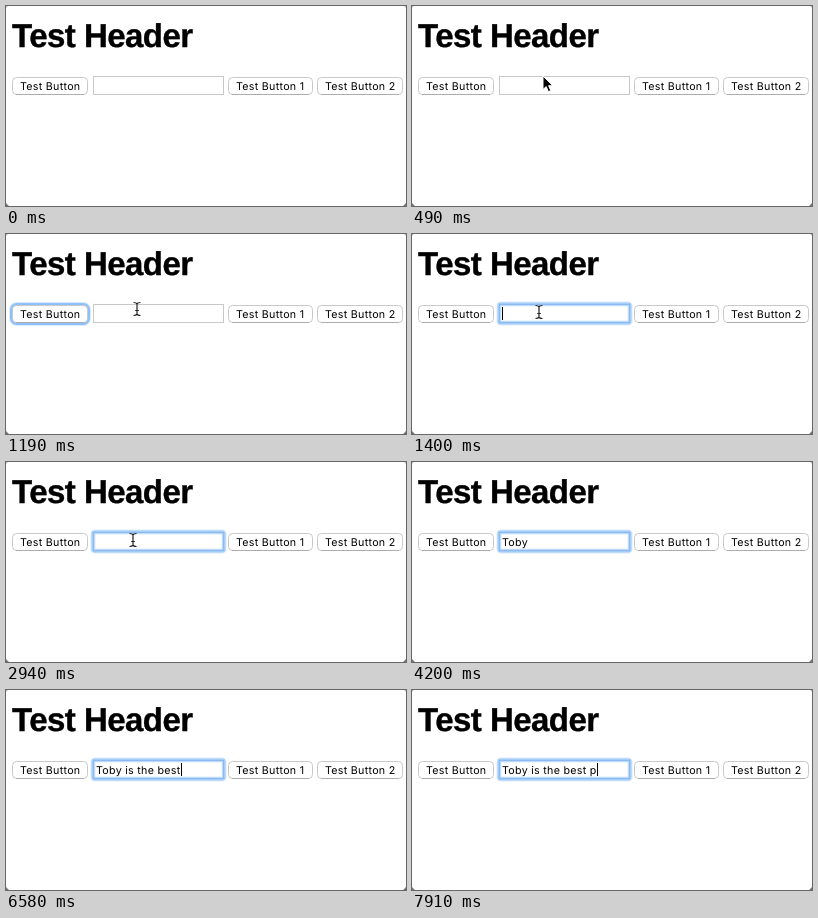
These frames come from a looping animation (400x200 px, 8 s). An HTML page:

```html
<!DOCTYPE html>
<html lang="en">
<head>
<meta charset="utf-8">
<title>Form focus and typing</title>
<style>
  html, body { margin: 0; width: 100%; height: 100%; overflow: hidden; background: #fff; }
  svg { display: block; width: 400px; height: 200px; }
  text { white-space: pre; fill: #000; text-rendering: geometricPrecision; }
  .heading {
    font: bold 33px "Liberation Sans", Arial, sans-serif;
    letter-spacing: -.53px; stroke: #000; stroke-width: .4px;
  }
  .ui { font: 10.7px Inter, "Open Sans", sans-serif; letter-spacing: .28px; }
</style>
</head>
<body>
<svg viewBox="0 0 400 200">
  <rect width="400" height="200" fill="#fff"/>
  <path d="M0 0h2l-2 2zM400 0h-2l2 2z" fill="#bbb"/>
  <path d="M0 200v-3l3 3zM400 200v-3l-3 3z" fill="#777"/>
  <text class="heading" x="6" y="41">Test Header</text>

  <g id="buttons"></g>

  <rect x="87.5" y="70.5" width="130" height="18" fill="#fff" stroke="#c8c8c8"/>
  <g id="fieldRing" fill="none">
    <rect x="87" y="70" width="131" height="19" rx="2" stroke="#dcebfc" stroke-width="5"/>
    <rect x="87" y="70" width="131" height="19" rx="1.5" stroke="#a3ccf8" stroke-width="3"/>
    <rect x="87.5" y="70.5" width="130" height="18" stroke="#8abaf0"/>
  </g>
  <text id="typed" class="ui" x="90" y="84"></text>
  <rect id="caret" y="73" width="1" height="13"/>

  <path id="arrow" d="M0 0V13.5L3.2 10.6L5.4 15.6L7.8 14.6L5.6 9.7H9.8Z"
        fill="#000" stroke="#fff" stroke-width="1" stroke-linejoin="round"/>
  <path id="beam" d="M-3.5 -6.5Q-.5 -6.5 0 -5Q.5 -6.5 3.5 -6.5M0 -5V5M-3.5 6.5Q-.5 6.5 0 5Q.5 6.5 3.5 6.5M-1.8 1.5H1.8"
        fill="none" stroke="#222" stroke-width="1.2"/>
</svg>
<script>
const LOOP = 8000, TICK = 70;
const BUTTON_FOCUS = 840, FIELD_FOCUS = 1400;
const CARET_ON = 490, CARET_PERIOD = 1050;
const MESSAGE = "Toby is the best p";
const KEY_TIMES = [
  3080, 3220, 3360, 3640, 3710,
  4760, 4900, 4970,
  5180, 5320, 5390, 5530,
  5950, 6160, 6370, 6580, 6790,
  7910
];
// time, x, y of the pointer
const POINTER = [
  [70, 374, 138], [280, 235, 98], [490, 131, 70], [770, 46, 80],
  [1050, 46, 80], [1190, 131, 75], [1330, 127, 78]
];

const $ = id => document.getElementById(id);
const show = (el, on) => el.setAttribute("visibility", on ? "visible" : "hidden");

function button(x, width, label) {
  return `<rect x="${x + .5}" y="71.5" width="${width - 1}" height="17" rx="4" fill="#fff" stroke="#c9c9c9"/>
    <path d="M${x + 4} 88.5H${x + width - 4}" stroke="#adadad"/>
    <text class="ui" x="${x + 8}" y="84">${label}</text>`;
}

$("buttons").innerHTML =
  `<g id="buttonRing" fill="none">
    <rect x="5.5" y="70.5" width="77" height="19" rx="5" stroke="#dcebfc" stroke-width="5"/>
    <rect x="5.5" y="70.5" width="77" height="19" rx="5" stroke="#8fbff8" stroke-width="3"/>
  </g>` +
  button(6, 76, "Test Button") +
  button(222, 85, "Test Button 1") +
  button(311, 86, "Test Button 2");

function pointerAt(t) {
  const next = POINTER.findIndex(p => p[0] > t);
  if (next < 0) return POINTER[POINTER.length - 1].slice(1);
  const [t0, x0, y0] = POINTER[Math.max(0, next - 1)];
  const [t1, x1, y1] = POINTER[next];
  const k = t1 > t0 ? (t - t0) / (t1 - t0) : 0;
  return [x0 + (x1 - x0) * k, y0 + (y1 - y0) * k];
}

function drawPointer(t) {
  const visible = t >= POINTER[0][0] && t < KEY_TIMES[0];
  const [x, y] = pointerAt(t);
  const overField = x > 87 && x < 218 && y > 70 && y < 89;
  for (const [el, on] of [[$("arrow"), !overField], [$("beam"), overField]]) {
    el.setAttribute("transform", `translate(${Math.round(x)} ${Math.round(y)})`);
    show(el, visible && on);
  }
}

function drawField(t) {
  const count = KEY_TIMES.filter(k => k <= t).length;
  const lastInput = count ? KEY_TIMES[count - 1] : FIELD_FOCUS;
  const focused = t >= FIELD_FOCUS;
  const typed = $("typed");
  typed.textContent = MESSAGE.slice(0, count);
  const width = count ? typed.getComputedTextLength() : 0;
  $("caret").setAttribute("x", Math.round(90 + width));
  show($("fieldRing"), focused);
  show($("caret"), focused && (t - lastInput) % CARET_PERIOD < CARET_ON);
}

function render(ms) {
  const t = Math.floor((ms % LOOP + 1) / TICK) * TICK;
  show($("buttonRing"), t >= BUTTON_FOCUS && t < FIELD_FOCUS);
  drawField(t);
  drawPointer(t);
}

const start = performance.now();
function frame() {
  render(performance.now() - start);
  requestAnimationFrame(frame);
}
frame();
</script>
</body>
</html>
```
